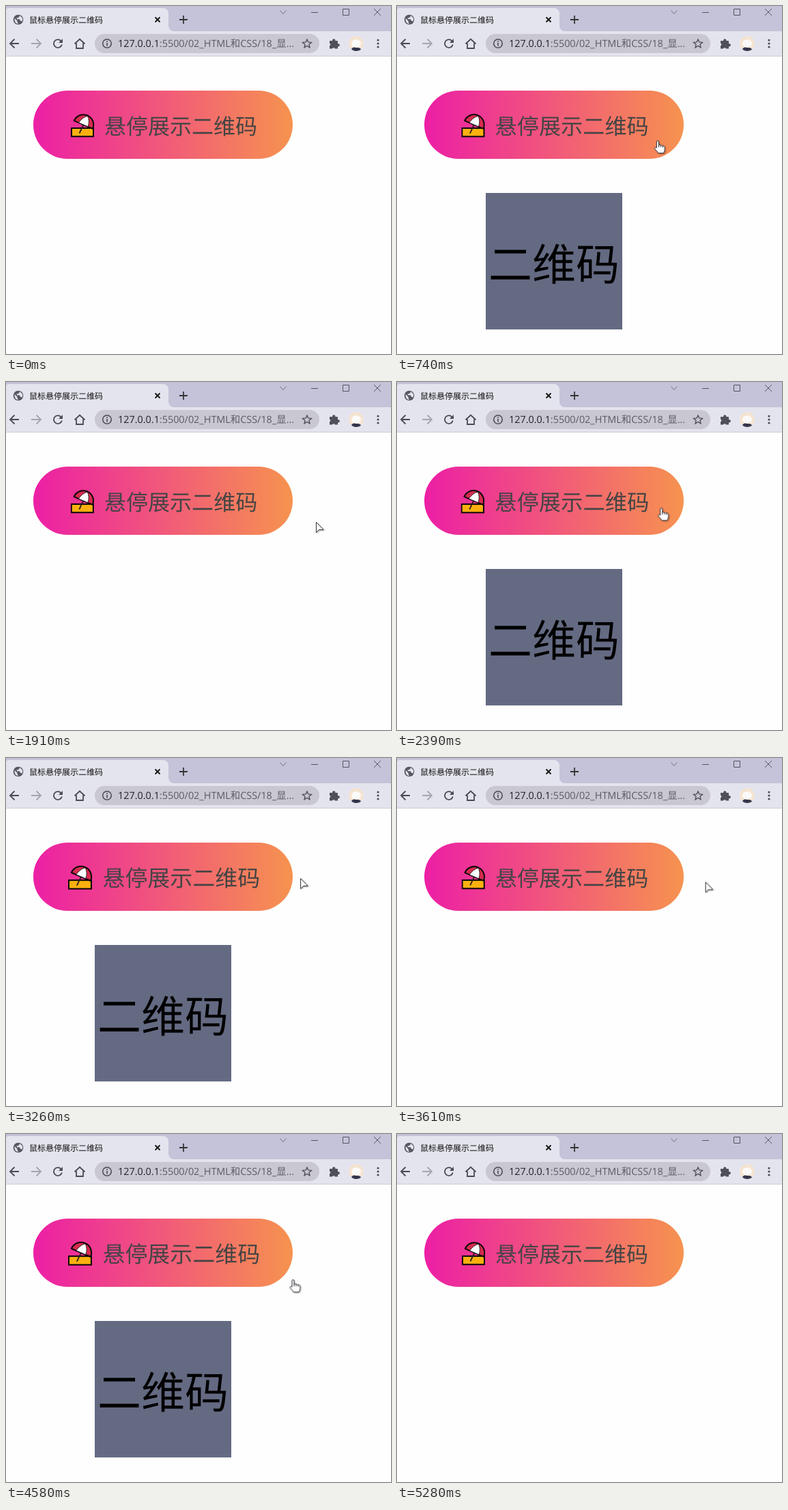
Write an HTML page that moves like this. It is 564 px wide and 510 px high and loops after 5610 ms.

```html
<!DOCTYPE html>
<html lang="zh-CN">
<head>
<meta charset="utf-8">
<title>悬停展示</title>
<style>
  html, body { margin: 0; width: 100%; height: 100%; overflow: hidden; background: #fefefe; }
  svg { display: block; }
  text { font-family: "Noto Sans CJK SC", "Noto Sans CJK", sans-serif; text-rendering: geometricPrecision; }
  .url { font: 14.4px "Open Sans", "Noto Sans CJK SC", sans-serif; fill: #5b5b64; }
  .url .host { fill: #202124; }
  .icon { fill: none; stroke: #4a4a52; stroke-width: 1.8; }
  .thin { stroke: #55555f; stroke-width: 1; }

  .label, .panel, .cursor, .hand, .arrow { animation: 5610ms infinite; }
  .label { animation-name: grow; transform-origin: 230px 175.5px; }
  .panel { animation-name: hover; animation-timing-function: step-end; }
  .cursor { animation-name: move; animation-timing-function: linear; }
  .hand { animation-name: hand; animation-timing-function: step-end; }
  .arrow { animation-name: arrow; animation-timing-function: step-end; }

  /* half-second ease on every enter and leave */
  @keyframes grow {
    0%, 11.94% { transform: scale(1); }
    20.86%, 27.81% { transform: scale(1.03); }
    36.72%, 40.64% { transform: scale(1); }
    49.55%, 59.36% { transform: scale(1.03); }
    67.2%, 67.38% { transform: scale(1); }
    76.29%, 81.82% { transform: scale(1.03); }
    90.73%, 100% { transform: scale(1); }
  }
  @keyframes hover {
    0%, 27.81%, 59.36%, 81.82%, 100% { visibility: hidden; }
    11.94%, 40.64%, 67.38% { visibility: visible; }
  }
  @keyframes hand {
    0%, 27.81%, 57%, 81.82%, 100% { opacity: 0; }
    11.94%, 40.64%, 67.38% { opacity: 1; }
  }
  @keyframes arrow {
    0%, 11.94%, 40.64%, 67.38%, 94.12%, 100% { opacity: 0; }
    1.25%, 27.81%, 57%, 81.82% { opacity: 1; }
  }
  @keyframes move {
    0%, 1.25% { transform: translate(527px, 461px); }
    5.35% { transform: translate(455px, 340px); }
    8.02% { transform: translate(423px, 270px); }
    10.7% { transform: translate(437px, 217px); }
    13.19% { transform: translate(382px, 197px); }
    16.93% { transform: translate(345px, 192px); }
    21.93% { transform: translate(375px, 196px); }
    25.49%, 27.81% { transform: translate(410px, 198px); }
    32.8% { transform: translate(452px, 204px); }
    34.05% { transform: translate(454px, 205px); }
    37.43% { transform: translate(440px, 200px); }
    40.64% { transform: translate(415px, 188px); }
    43.85%, 54.72% { transform: translate(370px, 182px); }
    58.11% { transform: translate(431px, 176px); }
    61.5% { transform: translate(453px, 180px); }
    65.6% { transform: translate(451px, 182px); }
    67.38% { transform: translate(415px, 178px); }
    71.84% { transform: translate(341px, 174px); }
    76.83%, 78.43% { transform: translate(330px, 176px); }
    81.82% { transform: translate(425px, 215px); }
    84.67% { transform: translate(500px, 330px); }
    86.99% { transform: translate(551px, 430px); }
    89.13% { transform: translate(541px, 483px); }
    92.69%, 100% { transform: translate(543px, 500px); }
  }
</style>
</head>
<body>
<svg width="564" height="510" viewBox="0 0 564 510">
  <defs>
    <linearGradient id="warm">
      <stop stop-color="#ec1fa5"/>
      <stop offset="1" stop-color="#f6934f"/>
    </linearGradient>
    <clipPath id="face"><circle cx="513" cy="55" r="11"/></clipPath>
    <filter id="shade" x="-50%" y="-50%" width="200%" height="200%">
      <feDropShadow dx="1" dy="1" stdDeviation=".8" flood-opacity=".35"/>
    </filter>
  </defs>

  <!-- window frame -->
  <rect width="564" height="37" fill="#c5c3d9"/>
  <path d="M0 3H230a8 8 0 0 1 8 8V29a8 8 0 0 0 8 8H564V73H0Z" fill="#e4e4ee"/>
  <path d="M0 3H4Q0 3 0 7Z" fill="#c5c3d9"/>
  <path d="M0 73.5H564" stroke="#cbcbd2"/>

  <!-- tab -->
  <circle cx="18" cy="20" r="7.3" fill="#57575f"/>
  <path d="M12.5 18l4 3.8v2l1.3 1.3v1.2q-5.8-1.3-5.3-8.3ZM19.5 14v1.8l-1.7 1.4h-2v2h4l1 2.6h1.6l1 1.4q2.8-6.2-3.9-9.2Z" fill="#e4e4ee"/>
  <text x="34" y="24.6" font-size="12" fill="#111">鼠标悬停展示二维码</text>
  <g class="icon">
    <path d="M218.5 16.5l7 7m0-7l-7 7" stroke="#111"/>
    <path d="M254 20h12M260 14v12" stroke="#333"/>
    <path class="thin" d="M401.5 6.5L406 11.5L410.5 6.5" stroke-opacity=".7"/>
    <path class="thin" d="M447 9.5h10M493.5 4.5h9v9h-9ZM539 4l10 10m0-10l-10 10"/>
  </g>

  <!-- toolbar -->
  <rect x="130" y="41" width="329" height="28" rx="14" fill="#c9c8d2"/>
  <g class="icon">
    <path d="M19 55H6.5M12.5 48.5L6 55l6.5 6.5"/>
    <path d="M37 55H50M44.5 48.5L51 55l-6.5 6.5" stroke="#a5a5ae"/>
    <path d="M80.5 51.2A6 6 0 1 0 81.8 56.5"/>
    <path d="M83 48v6h-6Z" fill="#4a4a52" stroke="none"/>
    <path d="M100.5 55.5L108 48.5l7.5 7M103 54.5V62h10V54.5"/>
    <circle cx="148" cy="55" r="6.3" stroke-width="1.5"/>
    <path d="M148 54v4.5M148 51v1.7" stroke-width="1.6"/>
    <path d="M441 48.8l1.8 4.2 4.6.4-3.5 3 1.1 4.5-4-2.4-4 2.4 1.1-4.5-3.5-3 4.6-.4Z" stroke-width="1.3"/>
  </g>
  <text class="url" x="164" y="60"><tspan class="host">127.0.0.1</tspan>:5500/02_HTML和CSS/18_显...</text>
  <path d="M474 51h4.2a2.2 2.2 0 1 1 4.2 0H486v4.2a2.2 2.2 0 1 1 0 4.2V62.5h-4a2.2 2.2 0 0 0-4 0h-4v-4a2.2 2.2 0 0 0 0-4Z" fill="#505058"/>
  <g clip-path="url(#face)">
    <circle cx="513" cy="55" r="11" fill="#f5e4d0"/>
    <ellipse cx="513" cy="55" rx="7" ry="6" fill="#fbfaf8"/>
    <path d="M505 67q1-8 8-6 7-1 9 6Z" fill="#34364a"/>
  </g>
  <g fill="#4a4a52">
    <circle cx="545" cy="50" r="1.6"/><circle cx="545" cy="55" r="1.6"/><circle cx="545" cy="60" r="1.6"/>
  </g>

  <!-- button -->
  <rect x="40" y="124" width="380" height="100" rx="50" fill="url(#warm)"/>
  <g class="label">
    <rect x="96" y="179" width="32" height="12.2" fill="#fcb010" stroke="#0c0808" stroke-width="2"/>
    <path d="M114.5 172L107.5 186.5" stroke="#2b2118" stroke-width="1.8"/>
    <g stroke="#0c0808" stroke-linejoin="round">
      <path d="M99.8 168.2A14.6 14.6 0 0 1 127 179.8Z" fill="#d72a50" stroke-width="2"/>
      <path d="M106.5 171Q112 163 119.5 161.2Q123 168.5 120 176.8Z" fill="#fff" stroke-width=".8"/>
    </g>
    <text x="144" y="188" font-size="32" font-weight="350" fill="#444">悬停展示二维码</text>
  </g>

  <!-- pop-up -->
  <g class="panel">
    <rect x="130" y="274" width="200" height="200" fill="#646a82"/>
    <text x="134" y="402" font-size="64" font-weight="350">二维码</text>
  </g>

  <g class="cursor">
    <g fill="#fff" stroke="#33333b" stroke-linejoin="round" filter="url(#shade)">
      <path class="arrow" d="M.5.5V15.5L4.5 11.5H11.2Z"/>
      <path class="hand" d="M-1.5 11V2Q-1.5.5 0 .5T1.5 2V7Q3.2 5.6 4.4 7.3 6.2 6.2 7.3 8 10.3 7.4 10.3 10.2V13.5Q10.3 16 8.5 18.5H.8Q-1 15.5-4 12.6-4.8 10.8-3.5 10.1-2.6 9.8-1.5 11ZM1.5 7V10M4.4 7.3V10M7.3 8V10.5"/>
    </g>
  </g>
</svg>
</body>
</html>
```
